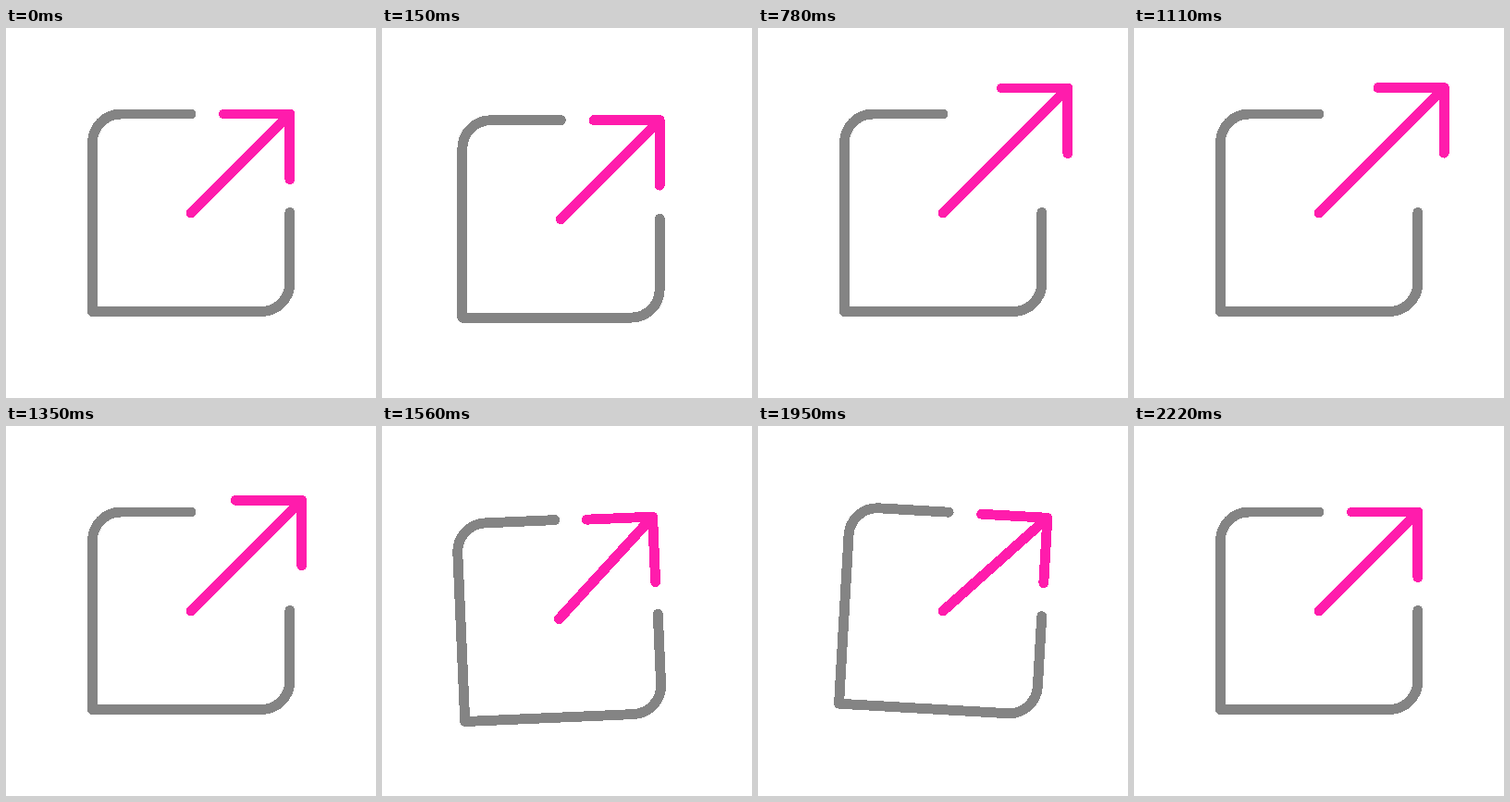
These frames come from a looping animation (400x400 px, 2.34 s). An HTML page:

```html
<!DOCTYPE html>
<html lang="en">
<head>
<meta charset="utf-8">
<title>External link</title>
<style>
  html, body { margin: 0; width: 100%; height: 100%; overflow: hidden; background: #fff; }
  svg { display: block; width: 100%; height: 100%; }
  path { fill: none; stroke-width: 10.9; stroke-linecap: round; stroke-linejoin: round; shape-rendering: crispEdges; }
  .box { stroke: #848484; }
  .arrow { stroke: #ff1cac; }
</style>
</head>
<body>
<svg viewBox="0 0 400 400">
  <!-- drawn around the centre of the stage -->
  <g id="icon" transform="translate(200 200)">
    <path class="box" d="M0 -107H-75.5A31 31 0 0 0 -106.5 -76V106.5H75.9A31 31 0 0 0 106.9 75.5V-.5"/>
    <path class="arrow" id="shaft" d="M0 0L106.9 -107"/>
    <path class="arrow" id="head" d="M35.6 -107H106.9V-36.5"/>
  </g>
</svg>
<script>
  const TICK = 30, LOOP = 2340, LAST = 74;

  const icon = document.getElementById('icon');
  const shaft = document.getElementById('shaft');
  const head = document.getElementById('head');

  // smooth step from 0 to 1 between ticks a and b
  function ramp(t, a, b) {
    const p = Math.min(1, Math.max(0, (t - a) / (b - a)));
    return p * p * (3 - 2 * p);
  }

  // rises from a to its peak, then falls until b
  const bump = (t, a, peak, b) => ramp(t, a, peak) - ramp(t, peak, b);

  // the icon winds up, and is knocked back when the arrow returns
  const recoil = t => 7.7 * bump(t, 0, 6.5, 11) + 9 * bump(t, 46, 53, 61);

  const tilt = t => 3.3 * bump(t, 57, 65, 74) - 4.4 * bump(t, 46, 57, 65);

  // the arrow shoots out, tugs, snaps back and dips slightly
  function reach(t) {
    const tug = 30 + 2 * Math.cos((t - 11) * Math.PI / 5);
    const out = ramp(t, 6, 11) - ramp(t, 41, 48.5);
    return out * tug - 1.3 * bump(t, 46, 54, 64);
  }

  function draw(ms) {
    const t = Math.min(LAST, Math.floor(ms % LOOP / TICK));
    const d = recoil(t), r = reach(t);
    icon.setAttribute('transform', `translate(${200 - d} ${200 + d}) rotate(${tilt(t)})`);
    shaft.setAttribute('d', `M0 0L${106.9 + r} ${-107 - r}`);
    head.setAttribute('transform', `translate(${r} ${-r})`);
  }

  const start = performance.now();
  function loop() {
    draw(performance.now() - start);
    requestAnimationFrame(loop);
  }
  loop();
</script>
</body>
</html>
```
